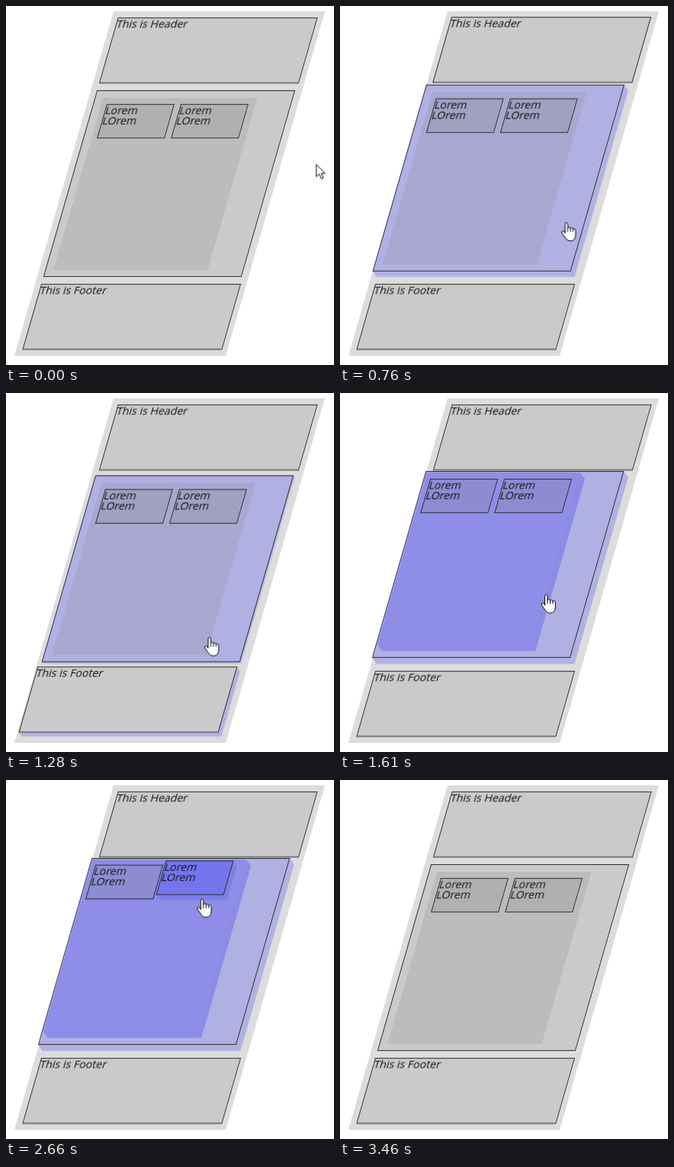
These frames come from a looping animation (430x469 px, 3.8 s). An HTML page:

```html
<!DOCTYPE html>
<html lang="en">
<head>
<meta charset="utf-8">
<title>Hover layers</title>
<style>
  html, body { margin: 0; width: 100%; height: 100%; overflow: hidden; background: #fff; }
  #page {
    position: absolute; left: 141px; top: 7px; width: 277px; height: 450px;
    background: #dcdcdc; transform: skewX(-16.11deg); transform-origin: 0 0;
    font: 14.15px/14px "Open Sans", "Noto Sans", sans-serif; color: #111;
  }
  .box {
    --edge: #b1b1e3;
    position: absolute; box-sizing: border-box;
    border: 1px solid #2c2c2c; background: rgba(128, 128, 128, .2);
  }
  #header, #main, #footer { left: 8px; width: 262px; height: 86px; }
  #header { top: 8px; }
  #main { top: 103px; width: 260px; height: 244px; }
  #footer { top: 356px; }
  #inner { --edge: #8c8ce8; left: 10px; top: 9px; width: 202px; height: 225px; border: 0; }
  #first, #second { --edge: #7f7fe8; left: 7px; top: 8px; width: 89px; height: 45px; }
  #second { left: 104px; }
  #pointer { position: absolute; left: 0; top: 0; width: 1px; height: 1px; overflow: visible; }
  #pointer path { fill: #fff; stroke: #000; stroke-linejoin: round; }
</style>
</head>
<body>
<div id="page">
  <div id="header" class="box">This is Header</div>
  <div id="main" class="box">
    <div id="inner" class="box">
      <div id="first" class="box">Lorem<br>LOrem</div>
      <div id="second" class="box">Lorem<br>LOrem</div>
    </div>
  </div>
  <div id="footer" class="box">This is Footer</div>
</div>
<svg id="pointer">
  <path id="arrow" d="M0 .5V16.5L3.8 13L6.6 19.4L9.2 18.3L6.5 12.2H11.5Z"/>
  <g id="hand" transform="translate(-.7 0)">
    <path d="M-1.7 14V1.8Q-1.7 0 0 0T1.7 1.8V7.5Q2 6 3.5 6T5.3 8Q5.8 6.8 7 6.8T8.7 9Q9.2 7.8 10.3 7.8T12 10V16Q12 24 5 24Q1 24 -1 20.5L-5.7 14Q-7 11.5 -5 10.8T-1.7 14Z"/>
    <path d="M1.7 7.5V12M5.3 8V12M8.7 9V12"/>
  </g>
</svg>
<script>
const LOOP = 3800, RISE = 300, DEPTH = 8;
const $ = id => document.getElementById(id);
const play = (el, frames) => el.animate(frames, { duration: LOOP, iterations: Infinity });
const at = (ms, props, easing = "linear") => ({ offset: ms / LOOP, easing, ...props });

// What the pointer rests on, from each moment until the next
const visits = [
  [215, "header"], [570, "main"], [905, "footer"], [1220, "main"], [1290, "inner"],
  [1890, "second"], [2200, "first"], [2500, "second"], [2800, "inner"], [3010, "main"], [3150]
];
const OVER = visits[0][0], OUT = visits.at(-1)[0], GONE = 3400;

// A box is hovered while the pointer rests on it or on anything inside it
function hoverSpans(box) {
  const spans = [];
  visits.slice(0, -1).forEach(([start, id], i) => {
    if (!box.contains($(id))) return;
    const end = visits[i + 1][0], last = spans.at(-1);
    if (last && last[1] === start) last[1] = end;
    else spans.push([start, end]);
  });
  return spans;
}

// Hard switches between two states
function toggle(el, spans, off, on) {
  play(el, [
    at(0, off, "step-end"),
    ...spans.flatMap(([a, b]) => [at(a, on, "step-end"), at(b, off, "step-end")]),
    at(LOOP, off)
  ]);
}

const edge = (color, size) =>
  Array.from({ length: DEPTH }, (_, i) => {
    const d = (i + 1) * size;
    return `${d}px ${d}px 0 ${color}`;
  }).join(",");

const down = { transform: "translate(0px, 0px)", boxShadow: edge("transparent", 0) };
const up = { transform: "translate(-9.2px, -8px)", boxShadow: edge("var(--edge)", 1) };

// Colour flips at once; the lift and its edge ease in and out
for (const box of document.querySelectorAll(".box")) {
  const spans = hoverSpans(box);
  play(box, [
    at(0, down),
    ...spans.flatMap(([a, b]) => [
      at(a, down, "ease"), at(a + RISE, up),
      at(b, up, "ease"), at(b + RISE, down)
    ]),
    at(LOOP, down)
  ]);
  toggle(box, spans,
    { backgroundColor: "rgba(128, 128, 128, .2)" },
    { backgroundColor: "rgba(30, 30, 248, .23)" });
}

// Pointer stops: time, x, y; it slows down towards each one
const stops = [
  [0, 407, 207], [400, 362, 67], [520, 362, 67], [1040, 262, 402], [1610, 271, 264],
  [2050, 262, 130], [2270, 171, 137], [2420, 150, 135], [2800, 282, 160],
  [3050, 330, 182], [GONE, 430, 258], [LOOP, 430, 258]
];
play($("pointer"), stops.map(([t, x, y]) =>
  at(t, { transform: `translate(${x}px, ${y}px)` }, "ease-out")));

const hidden = { visibility: "hidden" }, shown = { visibility: "visible" };
toggle($("hand"), [[OVER, OUT]], hidden, shown);
toggle($("arrow"), [[OVER, OUT], [GONE, LOOP]], shown, hidden);
</script>
</body>
</html>
```
